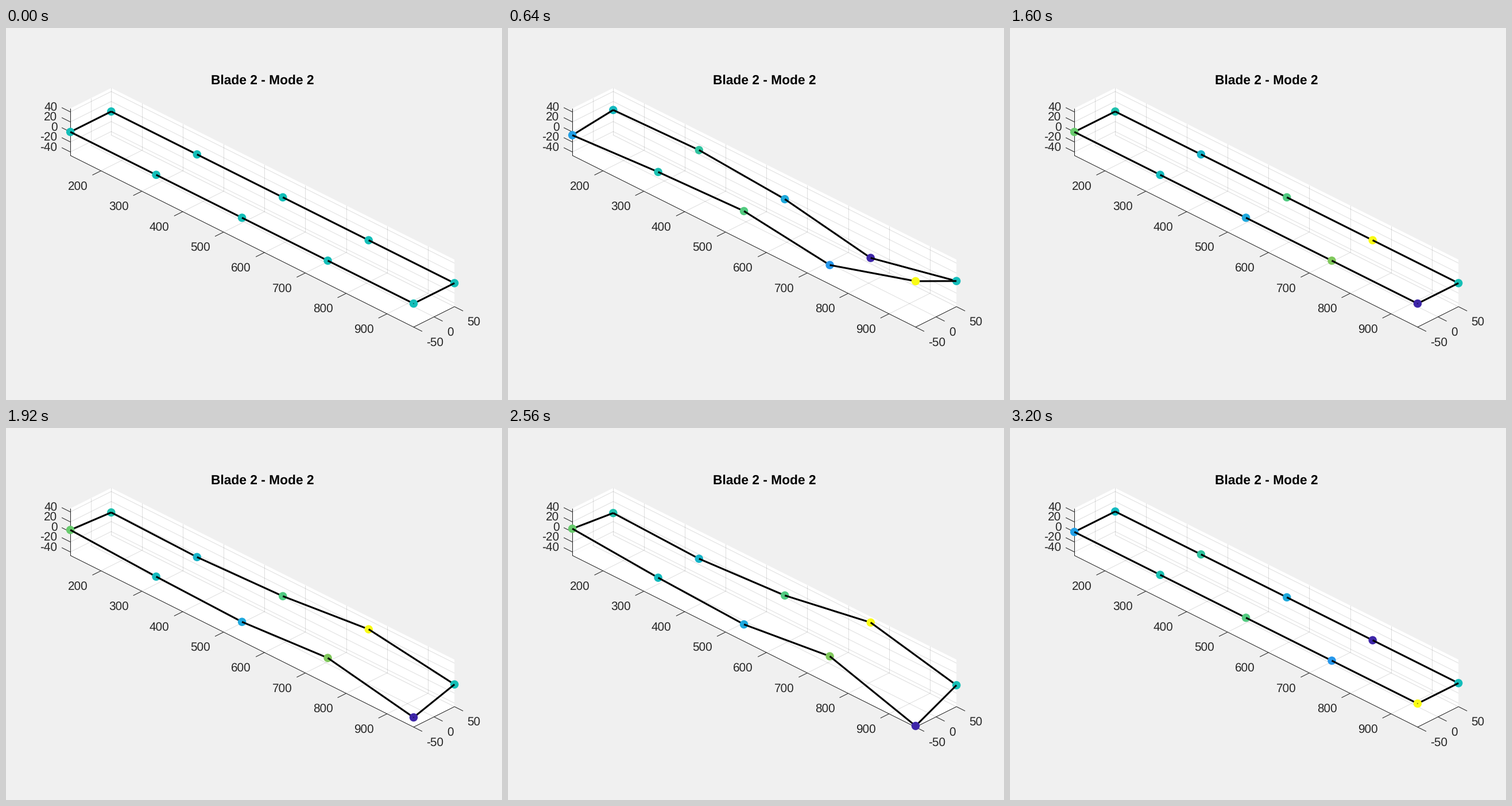
Recreate the animation shown at these times as a matplotlib script. Size 864 by 648 pixels, loop 3.36 s.

```python
import numpy as np
import matplotlib.pyplot as plt
from matplotlib.animation import FuncAnimation
from matplotlib.colors import LinearSegmentedColormap
from matplotlib.patches import Circle

W, H = 864, 648
FRAMES, STEP_MS = 21, 160
X0, X1, Y0, Y1, ZLIM = 125, 965, -50, 50, 47
INK = (0.15, 0.15, 0.15)

plt.rcParams["font.family"] = "Liberation Sans"
plt.rcParams["text.hinting"] = "no_hinting"

# dpi 72 makes one point equal one pixel
fig = plt.figure(figsize=(W / 72, H / 72), dpi=72, facecolor="#f0f0f0")
ax = fig.add_axes([0, 0, 1, 1])
ax.set_xlim(0, W)
ax.set_ylim(H, 0)
ax.axis("off")


def project(x, y, z):
    """Orthographic view, azimuth 45, elevation 30, in pixels."""
    across, along = x - X0, y - Y0
    return (112.1 + 0.7118 * (across + along),
            181.05 + 0.3559 * (across - along) - 0.872 * z)


def stroke(a, b, **style):
    (xa, ya), (xb, yb) = a, b
    return ax.plot([xa, xb], [ya, yb], solid_capstyle="butt", **style)[0]


def face(*corners):
    pts = [project(*c) for c in corners]
    ax.fill(*zip(*pts), color="white", lw=0, zorder=1)


def grid(a, b):
    stroke(project(*a), project(*b), color=INK, alpha=0.15, lw=1, zorder=2)


def edge(a, b):
    stroke(project(*a), project(*b), color=INK, lw=1.05, zorder=3)


def tick(point, dx, dy, label, tx, ty, ha):
    px, py = project(*point)
    end = px + dx, py + dy
    stroke((px, py), end, color=INK, lw=1.05, zorder=3)
    ax.text(end[0] + tx, end[1] + ty, str(label), ha=ha, va="baseline",
            fontsize=20.8, color=INK, zorder=3)


# Floor, long back wall and short left wall
face((X0, Y0, -ZLIM), (X1, Y0, -ZLIM), (X1, Y1, -ZLIM), (X0, Y1, -ZLIM))
face((X0, Y1, -ZLIM), (X1, Y1, -ZLIM), (X1, Y1, ZLIM), (X0, Y1, ZLIM))
face((X0, Y0, -ZLIM), (X0, Y1, -ZLIM), (X0, Y1, ZLIM), (X0, Y0, ZLIM))

for x in range(200, 1000, 100):
    grid((x, Y0, -ZLIM), (x, Y1, -ZLIM))
    grid((x, Y1, -ZLIM), (x, Y1, ZLIM))
    tick((x, Y0, -ZLIM), -15, 7.5, x, -8.2, 25.2, "right")
for y in (-50, 0, 50):
    if y > Y0:
        grid((X0, y, -ZLIM), (X1, y, -ZLIM))
        grid((X0, y, -ZLIM), (X0, y, ZLIM))
    tick((X1, y, -ZLIM), 15, 7.5, y, 7.3, 25.2, "left")
for z in range(-40, 41, 20):
    grid((X0, Y1, z), (X1, Y1, z))
    grid((X0, Y0, z), (X0, Y1, z))
    tick((X0, Y0, z), -15, -7.5, z, -7.6, 4.9, "right")

edge((X0, Y0, -ZLIM), (X0, Y0, ZLIM))
edge((X0, Y0, -ZLIM), (X1, Y0, -ZLIM))
edge((X1, Y0, -ZLIM), (X1, Y1, -ZLIM))

ax.text(447.1, 97.7, "Blade 2 - Mode 2", ha="center", va="baseline",
        fontsize=22.7, fontweight="bold", color="black")

parula = LinearSegmentedColormap.from_list("parula", [
    "#3e26a8", "#484cf0", "#327cfc", "#20a5e3", "#12beb9",
    "#5ccc76", "#c8c129", "#fec338", "#f9fb15"])

# Mode shape at five stations along each edge
near = [-6.8, 6, 14, -9.2, 47]
far = [3.2, 9.1, -3.9, -37.2, 4.4]

# Nodes run along the near edge, then back along the far edge
span = np.linspace(X0, X1, 5)
node_x = np.concatenate([span, span[::-1]])
node_y = np.repeat([Y0, Y1], 5)
shape = np.array(near + far[::-1])
tip = shape.argmax()
nearness = 5 + (node_x - node_y) / 1000
links = [(i, (i + 1) % 10) for i in range(10)]


def disc(radius, zorder):
    return ax.add_patch(Circle((0, 0), radius, color="black", lw=0,
                               zorder=zorder))


# Stacking by depth: a link covers its far node and passes under its near one
dots = [disc(7.25, d) for d in nearness]
bars = [ax.plot([], [], color="black", lw=3.1, solid_capstyle="butt",
                zorder=(nearness[a] + nearness[b]) / 2)[0] for a, b in links]
pin = disc(0.7, 9)


def draw(i):
    swing = np.sin(2 * np.pi * i / (FRAMES - 1))
    # Colours flip with each half cycle; the flat start is all mid-scale
    signed = shape * (-1 if 10 <= i < 20 else 1)
    level = (signed - signed.min()) / np.ptp(signed) if i else np.full(10, 0.5)
    px, py = project(node_x, node_y, shape * swing)
    for dot, x, y, f in zip(dots, px, py, level):
        dot.center = x, y
        dot.set_color(parula(f))
    for bar, (a, b) in zip(bars, links):
        bar.set_data([px[a], px[b]], [py[a], py[b]])
    pin.center = px[tip], py[tip]
    pin.set_visible(abs(swing) < 0.7)
    return dots + bars + [pin]


anim = FuncAnimation(fig, draw, frames=FRAMES, interval=STEP_MS,
                     repeat=True, repeat_delay=0, blit=False)
plt.show()
```
